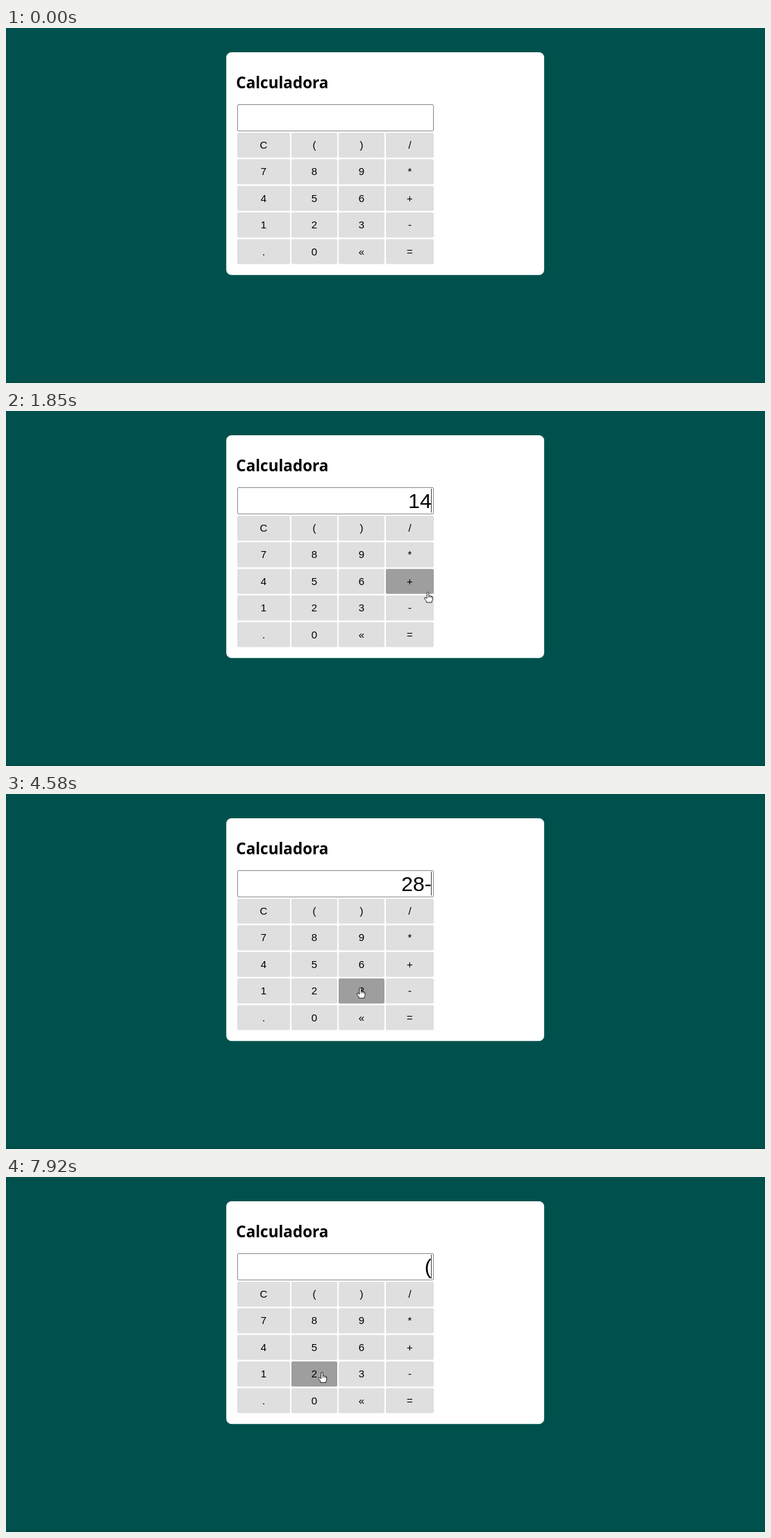
Animation of 1093 by 512 pixels, one loop 8 s. Source, as an HTML page:

```html
<!DOCTYPE html>
<html lang="pt">
<head>
<meta charset="utf-8">
<title>Calculadora</title>
<style>
  html, body { margin: 0; width: 100%; height: 100%; overflow: hidden; background: #00514d; }
  svg { display: block; width: 1093px; height: 512px; }
  text { font-family: "Liberation Sans", Arial, sans-serif; fill: #000; }
  .title { font: bold 22.5px "Open Sans", "Noto Sans", sans-serif; }
  .key { fill: #dfdfdf; }
  .key.hover { fill: #9e9e9e; }
  .label { font-size: 15px; text-anchor: middle; }
  .value { font-size: 30px; text-anchor: end; }
  .pointer path { fill: #fff; stroke: #111; stroke-width: .9; stroke-linejoin: round; }
  .pointer .lines { fill: none; stroke-width: .7; }
</style>
</head>
<body>
<svg viewBox="0 0 1093 512">
  <rect width="1093" height="512" fill="#00514d"/>
  <rect y="510.5" width="1093" height="1.5" fill="#004844"/>
  <rect x="317.2" y="35.1" width="457.8" height="321.2" rx="7.5" fill="#fff"/>
  <text class="title" x="331.3" y="87.1">Calculadora</text>
  <rect x="333.5" y="110.5" width="282" height="38" rx="1.5" fill="#fff" stroke="#8c8c8c"/>
  <text class="value" id="value" x="612.7" y="139.7"></text>
  <rect id="caret" x="612" y="112" width="1" height="34.5" fill="#444"/>
  <g id="keys"></g>
  <g class="pointer" id="hand">
    <path d="M-1.3 8.6V.8a1.3 1.3 0 0 1 2.6 0V5q1.2-.9 2.1.3 1.2-.7 1.9.4 1.5-.3 1.5 1.2v3q0 1.4-1.1 2.8v1.6H-2v-1.3C-2.6 11.4-4.6 9.8-5 8q.3-1.5 1.9-.5z"/>
    <path class="lines" d="M1.3 5v2.4M3.4 5.3v2.2M5.3 5.7v2"/>
  </g>
  <g class="pointer" id="arrow">
    <path d="M0 0V14l3.2-3 2.2 4.8 2-.9-2.1-4.7H10z"/>
  </g>
</svg>
<script>
const LOOP = 8000, HOVER_LAG = 35, BLINK = 500;
const ENTRY = { x: 971, y: 488 };
const $ = id => document.getElementById(id);

// One visit per key: leave the last one, arrive, press.
// dx, dy: spot on the key, from its centre; bend: height of the arc.
const visits = [
  { key: "1", leave: 150, arrive: 780, press: 990, dx: -9, dy: -6, bend: -120 },
  { key: "4", leave: 990, arrive: 1350, press: 1400 },
  { key: "+", leave: 1400, arrive: 1850, press: 2150, dx: 26, dy: 16 },
  { key: "1", leave: 2150, arrive: 2500, press: 2550 },
  { key: "4", leave: 2550, arrive: 2920, press: 3020 },
  { key: "=", leave: 3020, arrive: 3590, press: 3850 },
  { key: "-", leave: 3850, arrive: 4160, press: 4360 },
  { key: "3", leave: 4360, arrive: 4600, press: 4650 },
  { key: "0", leave: 4650, arrive: 5150, press: 5210 },
  { key: "=", leave: 5210, arrive: 5540, press: 5780, bend: -12 },
  { key: "C", leave: 6070, arrive: 6490, press: 6650, dx: -14, dy: -1 },
  { key: "(", leave: 6920, arrive: 7370, press: 7540 },
  { key: "2", leave: 7540, arrive: 7920, press: LOOP, dx: 11, dy: -2 }
];

const cols = [[333, 76], [411, 66], [479, 66], [547, 69]];
const rows = ["C()/", "789*", "456+", "123-", ".0«="];
const keys = {};

function add(name, attrs, text = "") {
  const el = document.createElementNS($("keys").namespaceURI, name);
  for (const k in attrs) el.setAttribute(k, attrs[k]);
  el.textContent = text;
  $("keys").append(el);
  return el;
}

rows.forEach((row, r) => [...row].forEach((label, c) => {
  const [x, width] = cols[c], y = 151 + r * 38.35, height = 36.1;
  const el = add("rect", { class: "key", x, y, width, height, rx: 2 });
  add("text", { class: "label", x: x + width / 2, y: y + 23.1 }, label);
  keys[label] = { el, x, y, width, height };
}));

let from = ENTRY;
for (const v of visits) {
  const k = keys[v.key], { dx = -3, dy = -4 } = v;
  v.from = from;
  from = v.to = { x: k.x + k.width / 2 + dx, y: k.y + k.height / 2 + dy };
}

function tipAt(t) {
  const v = visits.findLast(v => v.leave <= t);
  if (!v) return null;
  const u = Math.min(1, (t - v.leave) / (v.arrive - v.leave));
  const ease = u * u * (3 - 2 * u), arc = 4 * u * (1 - u) * (v.bend || 0);
  return {
    x: v.from.x + (v.to.x - v.from.x) * ease,
    y: v.from.y + (v.to.y - v.from.y) * ease + arc
  };
}

function press(value, key) {
  if (key === "C") return "";
  if (key !== "=") return value + key;
  return String(value.match(/[+-]?\d+/g).reduce((sum, n) => sum + Number(n), 0));
}

function place(el, tip, visible) {
  el.style.display = visible ? "" : "none";
  if (visible) el.setAttribute("transform", `translate(${tip.x} ${tip.y})`);
}

function draw(t) {
  const pressed = visits.filter(v => v.press <= t), last = pressed.at(-1);
  $("value").textContent = pressed.reduce((value, v) => press(value, v.key), "");
  const typing = last && !"=C".includes(last.key);
  const caretOn = typing && (t - last.press) % (2 * BLINK) < BLINK;
  $("caret").style.display = caretOn ? "" : "none";

  const tip = tipAt(t), over = tipAt(t - HOVER_LAG);
  for (const k of Object.values(keys)) {
    const inside = over && over.x >= k.x && over.x < k.x + k.width &&
      over.y >= k.y && over.y < k.y + k.height;
    k.el.classList.toggle("hover", !!inside);
  }
  const outside = tip && tip.x > 616;
  place($("hand"), tip, tip && !outside);
  place($("arrow"), tip, outside);
}

function tick() {
  draw(performance.now() % LOOP);
  requestAnimationFrame(tick);
}
tick();
</script>
</body>
</html>
```
